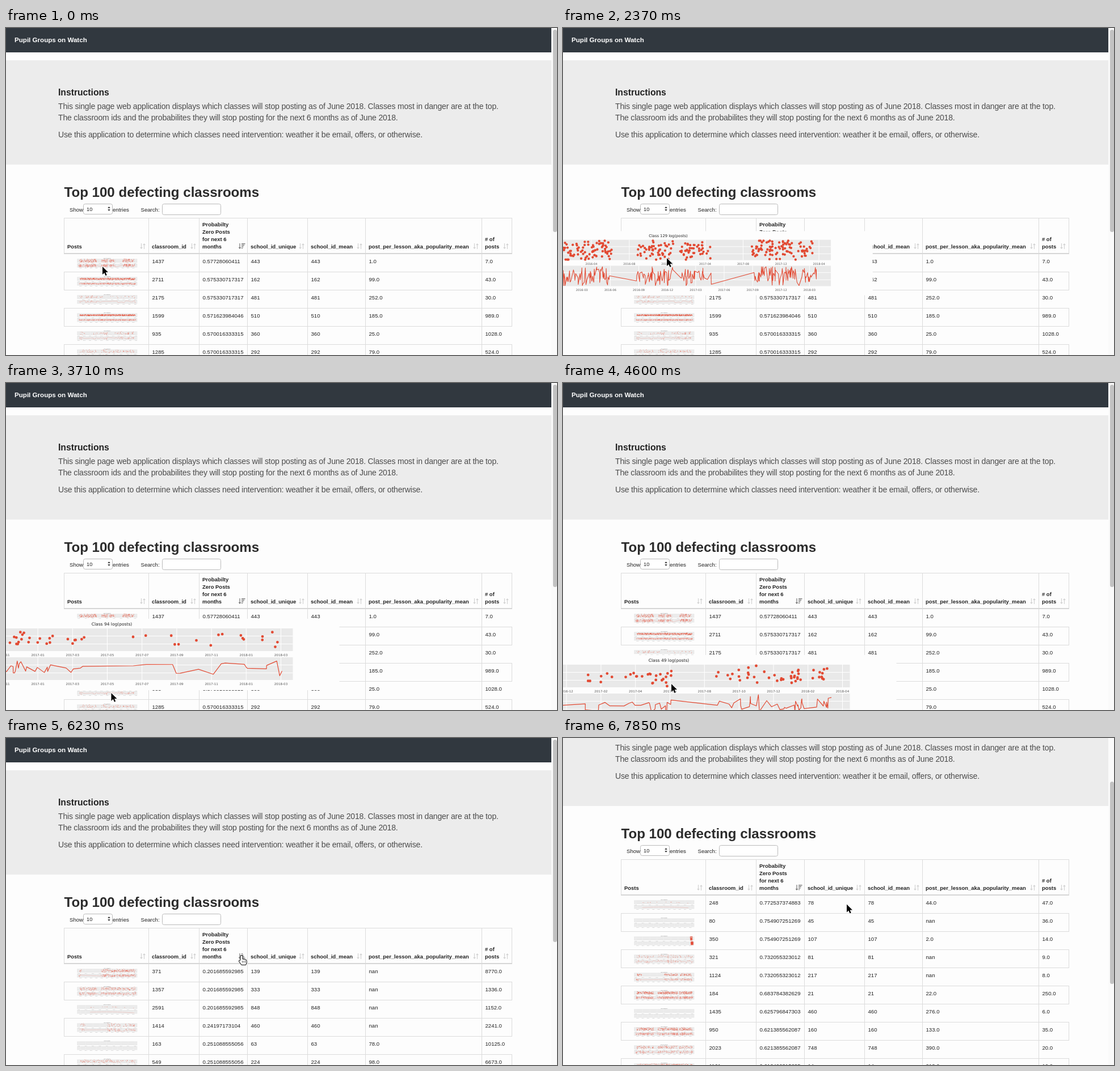
These frames come from a looping animation (971 px wide and 577 px high, 8000 ms). An HTML page with a canvas:

```html
<!DOCTYPE html>
<html lang="en">
<head>
<meta charset="utf-8">
<title>Classroom table</title>
<style>
html, body { margin: 0; width: 971px; height: 577px; overflow: hidden; }
canvas { display: block; }
</style>
</head>
<body>
<canvas id="stage" width="971" height="577"></canvas>
<script>
const g = document.getElementById('stage').getContext('2d');
const SANS = '"Liberation Sans", Arial, sans-serif', DEJA = '"DejaVu Sans", sans-serif';
const RED = '#e24a33', LINE = '#dcdcdc', INK = '#222';
const LOOP = 8000, MID = 176.5;

// The screen refreshes in bursts: first moment, last moment, refreshes
const steps = [[0, 0, 1], [600, 750, 2], [1340, 1490, 2], [1930, 2520, 5], [2820, 3260, 4],
  [3560, 4600, 8], [4900, 5930, 8], [6230, 6670, 2], [7120, 7410, 3], [7700, 7850, 2]
].flatMap(([a, b, n]) =>
  Array.from({ length: n }, (_, i) => Math.floor((a + (b - a) * i / (n - 1 || 1)) / 10) * 10));

// Pointer moves: start, end, x, y reached
const moves = [[0, 1, 170, 421], [450, 750, 182, 415], [1190, 1490, 185, 366], [1780, 2370, 183, 406],
  [2670, 3260, 179, 510], [3400, 3850, 186, 550], [3850, 4600, 191, 531],
  [4750, 5930, 414, 384], [6970, 7410, 500, 293.5]];

// Enlarged thumbnails: row, time it grows, time it shrinks
const zooms = [[0, 2154, 2896], [2, 2896, 3850], [4, 3850, 5200]];

// Stretches of time with posts, in thumbnail pixels
const spans = {
  none: [],
  full: [130, 228],
  terms: [129, 160, 168, 180, 182, 192, 205, 226],
  years: [130, 160, 167, 203, 205, 228],
  split: [130, 139, 178, 202, 207, 227],
  burst: [131, 139, 154, 180, 192, 212, 214, 225, 214, 225],
  early: [129, 228, 129, 160, 144, 160],
  late: [130, 133, 168, 228],
  tail: [224, 228]
};

// id, probability, school, per lesson, posts | class, span, dots per pixel, spread
const tables = [`
1437 0.57728060411 443 1.0 7.0|129 terms 4.5 24
2711 0.575330717317 162 99.0 43.0|61 full 6 13
2175 0.575330717317 481 252.0 30.0|94 early .4 20
1599 0.571623984046 510 185.0 989.0|72 full 7.5 10
935 0.570016333315 360 25.0 1028.0|49 burst 1.1 22
1285 0.570016333315 292 79.0 524.0|38 years 1.2 22`, `
371 0.201685592985 139 nan 8770.0|17 late 3.5 22
1357 0.201685592985 333 nan 1336.0|85 years 2.6 22
2591 0.201685592985 848 nan 1152.0|113 full .15 0
1414 0.24197173104 460 nan 2241.0|66 split 1.6 22
163 0.251088555056 63 78.0 10125.0|9 none 0 0
549 0.251088555056 224 98.0 6673.0|27 full 1.5 22`, `
248 0.772537374883 78 44.0 47.0|12 full .15 0
80 0.754907251269 45 nan 36.0|5 none 0 0
350 0.754907251269 107 2.0 14.0|20 tail 30 40
321 0.732055323012 81 nan 9.0|18 years 1.1 22
1124 0.732055323012 217 nan 8.0|56 split 3.4 16
184 0.683784382629 21 22.0 250.0|11 years 5.5 18
1435 0.625796847303 460 276.0 6.0|64 none 0 0
950 0.621385562087 160 133.0 35.0|47 years 4.5 20
2023 0.621385562087 748 390.0 20.0|101 years 2.5 20
1161 0.612400315635 14 212.0 10.0|58 full 4 20`].map(t => t.trim().split('\n').map(readRow));

function readRow(line) {
  const [cells, [cls, span, density, spread]] = line.split('|').map(s => s.split(' '));
  const ends = spans[span], pts = [];
  let seed = cls * 7919;
  const rnd = () => (seed = (seed * 16807 + 11) % 2147483647) / 2147483647;
  rnd();
  for (let i = 0; i < ends.length; i += 2) {
    const len = ends[i + 1] - ends[i];
    for (let n = Math.round(len * density); n > 0; n--) {
      const x = (ends[i] + len * rnd() - MID) * 6;
      const y = -26 + (+spread ? spread * (rnd() + rnd() - 1) : 12 * (x / 300) ** 2);
      pts.push([x, Math.max(-44, Math.min(-7, y))]);
    }
  }
  pts.sort((a, b) => a[0] - b[0]);
  cells.splice(3, 0, cells[2]);
  return { cells, cls, pts };
}

// Date axes: a month (1 = 2016-01), its x, width of a month, months per tick above and below
const axes = {
  129: [12, 8, 18.6, [4, 3]],
  94: [17, 2, 30.6, [2, 2]],
  49: [18, 12, 30.4, [2, 2]]
};

function text(s, x, y, size = 9.6, weight = 400, color = INK, family = SANS) {
  g.font = `${weight} ${size}px ${family}`;
  g.fillStyle = color;
  g.fillText(s, x, y);
}
function rect(x, y, w, h, color) {
  g.fillStyle = color;
  g.fillRect(x, y, w, h);
}
function box(x, y, w, h, r, fill, stroke) {
  g.beginPath();
  g.roundRect(x, y, w, h, r);
  g.fillStyle = fill;
  g.fill();
  if (stroke) { g.strokeStyle = stroke; g.lineWidth = 1; g.stroke(); }
}
function shape(d, x, y, fill, stroke, width) {
  const p = new Path2D(d);
  g.save();
  g.translate(x, y);
  if (stroke) { g.strokeStyle = stroke; g.lineWidth = width; g.lineJoin = 'round'; g.stroke(p); }
  g.fillStyle = fill;
  g.fill(p);
  g.restore();
}

function drawAxis(top, month, x0, w, every) {
  rect(-308, top, 637, 40, '#e9e9e9');
  rect(-308, top + 13, 637, 1, '#fff');
  rect(-308, top + 27, 637, 1, '#fff');
  for (let j = -6; j < 7; j++) {
    const x = x0 + j * every * w, m = month + j * every - 1;
    if (x < -300 || x > 325) continue;
    rect(x - .5, top, 1, 40, '#fff');
    const label = `${2016 + Math.floor(m / 12)}-${String((m % 12 + 12) % 12 + 1).padStart(2, '0')}`;
    text(label, x, top + 49, 5.6, 400, '#555', DEJA);
  }
}

function drawPlot({ cls, pts }, cy, scale) {
  g.save();
  g.translate(MID, cy);
  g.scale(scale / 6, scale / 6);
  if (scale > 1) rect(-411, -63, 822, 126, '#fdfdfd');
  g.textAlign = 'center';
  text(`Class ${cls} log(posts)`, 10, -51, 7.5, 400, INK, DEJA);
  const [month, x0, w, every] = axes[cls] || axes[129];
  drawAxis(-46, month, x0, w, every[0]);
  drawAxis(5, month, x0, w, every[1]);
  g.beginPath();
  for (const [x, y] of pts) {
    g.moveTo(x + 2.4, y);
    g.arc(x, y, 2.4, 0, 7);
  }
  g.fillStyle = RED;
  g.fill();
  g.beginPath();
  for (const [x, y] of pts) g.lineTo(34 + (x - 34) * 1.03, y + 51);
  g.strokeStyle = RED;
  g.lineWidth = 1.2;
  g.lineJoin = 'round';
  g.stroke();
  g.restore();
}

const cols = [102, 251, 340, 425, 531, 633, 838, 891];
const heads = ['Posts', 'classroom_id', 'Probabilty|Zero Posts|for next 6|months', 'school_id_unique',
  'school_id_mean', 'post_per_lesson_aka_popularity_mean', '# of|posts'];
const DOWN = 'M-.6-5h1.2v7h1.8l-2.4 3-2.4-3h1.8z', UP = 'M-.6 5h1.2v-7h1.8l-2.4-3-2.4 3h1.8z';

function drawHeader(rising) {
  heads.forEach((h, i) => {
    const lines = h.split('|'), x = cols[i + 1] - 10;
    lines.forEach((s, j) => text(s, cols[i] + 6, 389 - 13 * (lines.length - 1 - j), 9.45, 700));
    if (i === 2) {
      shape(DOWN, x - 3, 385, '#777');
      for (let j = 0; j < 4; j++) rect(x, 380 + j * 2.6, 2 + 1.5 * (rising ? j : 3 - j), 1.4, '#777');
    } else {
      shape(DOWN, x - 2.5, 385, '#d2d2d2');
      shape(UP, x + 2.5, 385, '#d2d2d2');
    }
  });
  rect(102, 335, 790, 1, LINE);
  cols.forEach(x => rect(x, 335, 1, 63, LINE));
  rect(102, 397, 790, 2, '#d6d6d6');
}

function drawRows(rows) {
  rows.forEach(({ cells }, i) => {
    const y = 398 + 32 * i;
    cells.forEach((s, j) => text(s, cols[j + 1] + 6.5, y + 17));
    cols.forEach((x, j) => {
      if (i % 2 || (j > 0 && j < 7)) rect(x, y, 1, 32, LINE);
    });
    rect(102, y + 32, 790, 1, LINE);
  });
}

const ease = p => 1 - (1 - Math.max(0, Math.min(1, p))) ** 2.35;
function zoomOf(row, t) {
  const z = zooms.find(z => z[0] === row);
  return z ? 1 + 5 * (ease((t - z[1]) / 365) - ease((t - z[2]) / 365)) : 1;
}

// Enlarged plots lie above the others.
function drawPlots(rows, t) {
  rows.map((row, i) => ({ row, y: 415 + 32 * i, scale: zoomOf(i, t) }))
    .sort((a, b) => a.scale - b.scale)
    .forEach(p => drawPlot(p.row, p.y, p.scale));
}

function drawCursor(t) {
  let [, , x, y] = moves[0];
  for (const [start, end, x1, y1] of moves) {
    const p = ease((t - start) / (end - start));
    x += (x1 - x) * p;
    y += (y1 - y) * p;
  }
  if (y > 335 && y < 397) {
    shape('M-1.5 8V1a1.5 1.5 0 0 1 3 0v5l5.5 1q1.5.5 1.5 2v3l-1.2 3.5h-7l-3.8-5q-1.2-2 .4-2.5z',
      x + 1, y + .5, '#fff', '#111', 2);
    for (const dx of [2, 4.5, 7]) rect(x + dx, y + 9, .8, 3.5, '#333');
  } else {
    shape('M0 0V14l3.3-3.1 2.2 5 2.2-1-2.1-4.8H10z', x, y, '#000', '#fff', 1.8);
  }
}

function drawIntro() {
  rect(0, 0, 961, 43, '#31383f');
  text('Pupil Groups on Watch', 15, 24.5, 11.6, 700, '#fff');
  rect(0, 57, 961, 184, '#ececec');
  text('Instructions', 92, 119, 15.7, 700);
  g.letterSpacing = '-0.17px';
  ['This single page web application displays which classes will stop posting as of June 2018. Classes most in danger are at the top.',
    'The classroom ids and the probabilites they will stop posting for the next 6 months as of June 2018.',
    'Use this application to determine which classes need intervention: weather it be email, offers, or otherwise.'
  ].forEach((s, i) => text(s, 92, [143, 163, 193][i], 14, 400, '#4c4c4c'));
  g.letterSpacing = '0px';
}

function drawControls() {
  text('Top 100 defecting classrooms', 102.5, 298, 24.1, 700, '#2b2b2b');
  text('Show', 112, 324);
  box(136.5, 310.5, 51, 18, 3, '#fff', '#bbb');
  text('10', 142, 322.5, 9.3);
  shape('M-2.2-1 0-4 2.2-1zM-2.2 1 0 4 2.2 1z', 181.5, 319, '#333');
  text('entries', 188, 324);
  text('Search:', 237.5, 324);
  box(275.5, 310.5, 103, 19, 3, '#fff', '#bbb');
}

function draw(t) {
  const scroll = t >= 7850 ? 121 : t >= 7700 ? 40 : 0;
  const rows = tables[t >= 6670 ? 2 : t >= 6230 ? 1 : 0];
  rect(0, 0, 971, 577, '#fdfdfd');
  g.save();
  g.translate(0, -scroll);
  drawIntro();
  drawControls();
  drawHeader(t >= 6230 && t < 6670);
  drawRows(rows);
  drawPlots(rows, t);
  g.restore();
  rect(961, 0, 10, 577, '#fafafa');
  box(964, 3 + scroll * 74 / 121, 7, 357, 3.5, '#c2c2c2');
  drawCursor(t);
}

let shown = -1;
function tick() {
  const now = performance.now() % LOOP;
  const t = steps.filter(s => s <= now).pop();
  if (t !== shown) draw(shown = t);
  requestAnimationFrame(tick);
}
tick();
</script>
</body>
</html>
```
